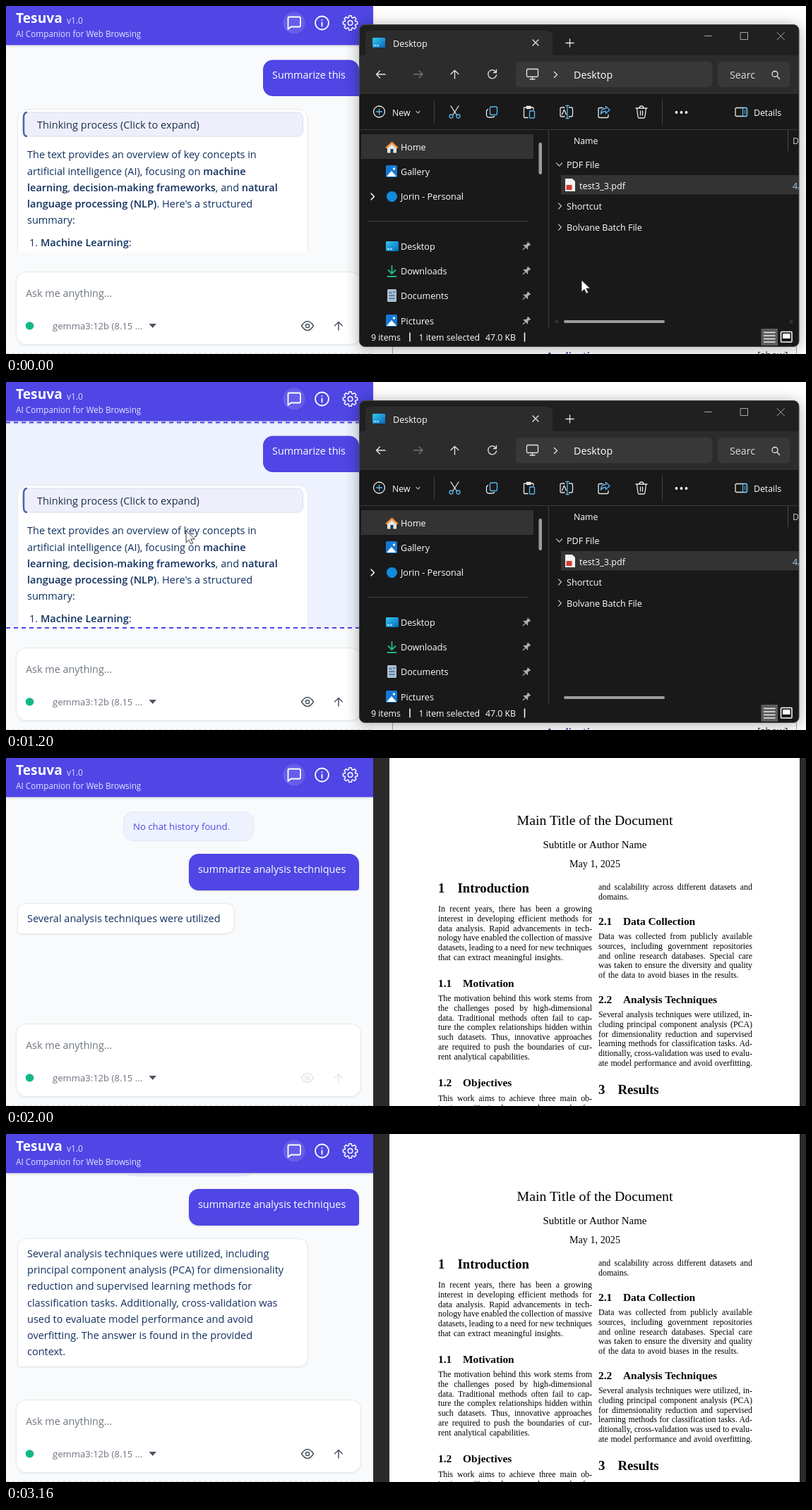
An HTML page for the animation above (3360 ms loop, 1133 by 494 pixels).

```html
<!DOCTYPE html>
<html lang="en">
<head>
<meta charset="utf-8">
<title>Browsing companion demo</title>
<style>
html, body { margin: 0; width: 100%; height: 100%; overflow: hidden; background: #fff; }
#doc, svg { position: absolute; left: 0; top: 0; width: 1133px; height: 494px; overflow: hidden; }
#doc { background: linear-gradient(90deg, #2b2b2b 543px, #fff 543px 1124px, #2b2b2b 1124px); color: #000; }
#doc div { position: absolute; white-space: nowrap; font: 11.9px/13.7px "Liberation Serif", serif; }
#doc .line { width: 218px; text-align-last: justify; word-spacing: -.85px; }
#doc .last { text-align-last: left; word-spacing: 1px; }
#doc .center { left: 543px; width: 582px; text-align: center; }
#doc .h1 { font-size: 18.7px; font-weight: bold; }
#doc .h2 { font-size: 15.4px; font-weight: bold; }
svg { font-family: "Open Sans", "Noto Sans", sans-serif; white-space: pre; }
.body { font-size: 14.5px; fill: #10305f; }
.bold { font-weight: 600; }
.white { font-size: 14.4px; fill: #fff; }
.card { fill: #fff; stroke: #e5e7eb; }
.line { fill: none; stroke-linecap: round; stroke-linejoin: round; }
.file { font-size: 12.6px; fill: #fff; }
.small { font-size: 12.3px; fill: #fff; }
</style>
</head>
<body>
<div id="doc"></div>
<svg viewBox="0 0 1133 494">
<defs>
  <clipPath id="chatClip"><rect y="56" width="520" height="292"/></clipPath>
  <clipPath id="winClip"><rect x="500.5" y="26.5" width="622.5" height="457" rx="8"/></clipPath>
  <linearGradient id="screen" x2="1" y2="1"><stop stop-color="#35c9ea"/><stop offset="1" stop-color="#0869c4"/></linearGradient>
  <g id="desk"><rect width="18" height="14" rx="1.5" fill="url(#screen)"/><path d="M2 11h3M6 11h3" stroke="#c8f4ff" stroke-width="1.5"/></g>
  <g id="photo"><rect width="16" height="17" rx="2" fill="#1778d4"/><path d="M1 16 8 8l7 8z" fill="#fff"/><circle cx="11.5" cy="5" r="1.7" fill="#fff"/></g>
  <g id="pin" transform="rotate(45)"><path d="M-3-6h6v1l-1 1v3l3 3H-5l3-3v-3l-1-1z" fill="#a9b0b6"/><path d="M0 2v5" stroke="#a9b0b6" stroke-width="1.3"/></g>
</defs>

<!-- web page behind the file window -->
<g id="web">
  <rect x="520" width="613" height="494" fill="#fff"/>
  <path d="M547.5 480v14M1119.5 480v14" stroke="#a2a9b1"/>
  <text x="765" y="502" font-size="14" font-weight="700" fill="#3a4fb0">Applications</text>
  <text x="1064" y="501" font-size="14" fill="#333">[show]</text>
</g>

<!-- companion panel -->
<rect width="520" height="494" fill="#f9fafb"/>
<rect id="dropArea" y="56" width="520" height="293"/>
<g clip-path="url(#chatClip)">
  <g id="oldChat">
    <path d="M378 76.5H486a14 14 0 0 1 14 14V128H378a14 14 0 0 1-14-14V90.5a14 14 0 0 1 14-14z" fill="#4f46e5"/>
    <text x="377" y="103" class="white">Summarize this</text>
    <rect class="card" x="16.5" y="146.5" width="411" height="230" rx="14"/>
    <rect x="24" y="151" width="396.5" height="34" rx="8" fill="#eeeffa" stroke="#d9dcec"/>
    <path d="M30 151q-5 0-5 7v20q0 7 5 7" fill="none" stroke="#4668b5" stroke-width="2.5"/>
    <text x="44" y="174" font-size="14.6" fill="#1f2f4d">Thinking process (Click to expand)</text>
    <g class="body">
      <text x="30" y="216">The text provides an overview of key concepts in</text>
      <text x="30" y="240">artificial intelligence (AI), focusing on <tspan class="bold">machine</tspan></text>
      <text x="30" y="263"><tspan class="bold">learning</tspan>, <tspan class="bold">decision-making frameworks</tspan>, and <tspan class="bold">natural</tspan></text>
      <text x="30" y="286"><tspan class="bold">language processing (NLP)</tspan>. Here's a structured</text>
      <text x="30" y="309">summary:</text>
      <text x="33" y="341">1. <tspan class="bold">Machine Learning</tspan>:</text>
    </g>
  </g>
  <g id="newChat">
    <rect x="166.5" y="76.5" width="184" height="41" rx="14" fill="#eef2ff" stroke="#e0e5f5"/>
    <text x="180" y="101.5" font-size="13.2" fill="#4f46e5">No chat history found.</text>
    <g id="question">
      <path d="M273 136H486a14 14 0 0 1 14 14V184a4 4 0 0 1-4 4H273a14 14 0 0 1-14-14V150a14 14 0 0 1 14-14z" fill="#4f46e5" filter="drop-shadow(0 1px 1px #0002)"/>
      <text x="272" y="163" class="white">summarize analysis techniques</text>
    </g>
    <g id="answer">
      <path id="answerCard" class="card" filter="drop-shadow(0 1px 1px #0001)"/>
      <g id="answerText" class="body"></g>
    </g>
  </g>
</g>
<rect id="thumb" x="513" width="2.5" rx="1" fill="#858585"/>
<path id="dropLines" d="M0 57.5H520M0 349H520" stroke-width="1.8" stroke-dasharray="6 5"/>

<rect width="520" height="55.5" fill="#4f46e5" filter="drop-shadow(0 1px 2px #0002)"/>
<text x="14" y="24" font-size="19.2" font-weight="700" fill="#fff">Tesuva</text>
<text x="86" y="25" font-size="12" fill="#e0e0ff">v1.0</text>
<text x="14" y="44" font-size="11.75" fill="#e4e4ff">AI Companion for Web Browsing</text>
<circle cx="408" cy="24" r="15.5" fill="#665eea"/>
<g class="line" stroke="#fff" stroke-width="1.8">
  <path d="M399.5 33V17.5q0-2 2-2h13.5q2 0 2 2v10q0 2-2 2h-11.5z"/>
  <circle cx="447.5" cy="24" r="9.5"/><path d="M447.5 23.5v5M447.5 19.8v.1"/>
  <path id="gear" stroke-width="1.5"/><circle cx="487.5" cy="24" r="3.3" stroke-width="1.5"/>
</g>

<rect id="ring" x="12" y="375" width="493" height="108" rx="16" fill="#dfdffa"/>
<rect id="field" x="14.5" y="377.5" width="488" height="103" rx="14" fill="#fff" filter="drop-shadow(0 1px 1px #0001)"/>
<text id="prompt" x="28" y="413" font-size="14.4"></text>
<path id="caret" d="M237 398v19" stroke="#111"/>
<circle cx="33.5" cy="454" r="5.8" fill="#14b887"/>
<text x="66" y="459" font-size="13.1" fill="#6b7280">gemma3:12b (8.15 ...</text>
<path d="M202.5 451h10.5l-5.25 6z" fill="#4b5563"/>
<g class="line" stroke="#4b5563" stroke-width="1.5">
  <g id="eye"><path d="M418.5 454q8.5-13 17 0-8.5 13-17 0z"/><circle cx="427" cy="454" r="2.6"/></g>
  <path id="send" d="M471 460V448.5M465.5 454l5.5-5.5 5.5 5.5"/>
</g>
<path d="M0 493.5H520" stroke="#d4d4d8" stroke-dasharray="5 3"/>

<!-- file window -->
<g id="win" filter="drop-shadow(0 2px 10px #0005)">
<g clip-path="url(#winClip)">
  <rect x="500" y="26" width="624" height="459" fill="#191919"/>
  <path d="M500 26h624v44H500z" fill="#202020"/>
  <path d="M500 70H509V43q0-8 8-8H766q8 0 8 8V70h350v54H500z" fill="#2c2c2c"/>
  <rect id="minHover" x="969" y="27" width="51" height="31" fill="#303030"/>
  <path d="M500 124H1124M500 175.5H1124" stroke="#3a3a3a"/>
  <rect x="722" y="79" width="278" height="36" rx="5" fill="#383838"/>
  <rect x="1008" y="79" width="102" height="36" rx="5" fill="#383838"/>
  <use href="#desk" x="519" y="45"/>
  <text x="548" y="57.5" class="file">Desktop</text>
  <g font-size="14.3" fill="#fff"><text x="804" y="102.5">Desktop</text><text x="1025" y="102.5" fill="#ddd">Searc</text></g>

  <g class="line" stroke="#e8e8e8" stroke-width="1.3">
    <path d="M746 48l8 8m0-8l-8 8M793 52.5h11M798.5 47v11"/>
    <path d="M537 97h-12.5m5-5-5 5 5 5M635.5 103V91.5m-5.5 5 5.5-5 5.5 5M776.5 93.5l4 4-4 4"/>
    <path d="M577.5 97H590m-5-5 5 5-5 5" stroke="#777"/>
    <path d="M694 94a6 6 0 1 0 .6 4M694.5 90.5V94.5h-4"/>
    <rect x="737.5" y="89.5" width="16" height="11" rx="1.5"/><path d="M742 104h7M745.5 101v3"/>
    <circle cx="1089" cy="96.5" r="4"/><path d="M1092 99.5l3.5 4"/>
    <path d="M989.5 42.5h10M1040.5 37.5h10v10h-10zM1092 37.5l10.5 10.5m0-10.5L1092 48" stroke="#a8a8a8" stroke-width="1"/>
    <circle cx="528.5" cy="150" r="8"/><path d="M528.5 146v8M524.5 150h8" stroke="#58b8f0"/>
    <path d="M581 149.5l2.5 2.5 2.5-2.5" stroke="#aaa"/>
    <path d="M630 142l8.5 13M641 142l-8.5 13"/>
    <g stroke="#58b8f0"><circle cx="630.5" cy="156.5" r="2.5"/><circle cx="640.5" cy="156.5" r="2.5"/></g>
    <rect x="685.5" y="143" width="10" height="11.5" rx="2" stroke="#58b8f0"/><path d="M682.5 147q-2 .5-2 2.5v5q0 3.5 3.5 3.5h5q2 0 2.5-1.5"/>
    <path d="M739 158.5h-4.5q-1 0-1-1V145q0-1 1-1H746q1 0 1 1v2M737.5 142.5h5.5v3h-5.5z"/><rect x="741.5" y="149" width="7" height="10" rx="1" stroke="#58b8f0"/>
    <path d="M791 144h-4q-2 0-2 2v9q0 2 2 2h4M797.5 144h3q2 0 2 2v9q0 2-2 2h-3M787.5 154l3-7 3 7"/><path d="M795 141.5v18M793 141.5h4M793 159.5h4" stroke="#58b8f0"/>
    <path d="M845 144.5h-4q-2 0-2 2v10q0 2 2 2h10q2 0 2-2v-2"/><path d="M849.5 142.5l5.5 5-5.5 5v-3q-5 0-7 4 0-8 7-8z" stroke="#58b8f0"/>
    <path d="M892 145h16M897 145q0-3 3-3t3 3M893.5 145l1.5 12q.2 2 2 2h6q1.8 0 2-2l1.5-12M898.5 149v6M901.5 149v6"/>
    <path d="M606.5 134v33M929.5 134v33" stroke="#3d3d3d"/>
    <rect x="1033" y="144.5" width="16.5" height="12" rx="2"/><path d="M1043.5 144.5h4q2 0 2 2v8q0 2-2 2h-4zM1046 149h1.5M1046 152h1.5" stroke="#58b8f0"/>
  </g>
  <g fill="#fff"><circle cx="949.5" cy="151" r="1.9"/><circle cx="956.5" cy="151" r="1.9"/><circle cx="963.5" cy="151" r="1.9"/></g>
  <text x="547" y="155.5" class="small">New</text>
  <text x="1059" y="155.5" class="small">Details</text>

  <rect x="503" y="182" width="244" height="35" fill="#333"/>
  <rect x="754.5" y="194" width="4.5" height="45" rx="2" fill="#9c9c9c"/>
  <path d="M768.5 176V458" stroke="#303030" stroke-width="2"/>
  <path d="M512 305.5H739" stroke="#444"/>
  <path d="M540 200v8.5h4.5V203h4v5.5h4.5V200l-6.5-6z" fill="#dfe7ec"/><path d="M539 201l7.5-7 7.5 7" class="line" stroke="#f08a35" stroke-width="2.5"/>
  <use href="#photo" x="538" y="226"/>
  <circle cx="546.5" cy="270.5" r="7.5" fill="#128bdd"/>
  <use href="#desk" x="538" y="334"/>
  <path d="M546.5 369v11m-5-5 5 5 5-5M540.5 384h12" class="line" stroke="#23b58c" stroke-width="1.8"/>
  <rect x="540" y="402" width="13" height="18" rx="1.5" fill="#a9bed2"/><path d="M542.5 407h4M542.5 411h8M542.5 415h8M548 406h3" stroke="#47698d" stroke-width="1.5"/>
  <use href="#photo" x="538" y="438"/>
  <g id="places" class="file"></g>

  <rect id="batchHover" x="770" y="299" width="353" height="29" fill="#2d2d2d"/>
  <rect id="fileRow" x="786" y="240" width="337" height="27.5"/>
  <path d="M1107.5 176v30" stroke="#4a4a4a"/>
  <g class="line" stroke="#bbb" stroke-width="1.2"><path d="M779.5 223l4 4 4-4M782.5 280l4 4-4 4M782.5 310l4 4-4 4"/><path d="M517 266l4.5 4.5-4.5 4.5" stroke="#fff" stroke-width="1.5"/></g>
  <path d="M792 245h10l4 4v14h-14z" fill="#f2f2f2"/><rect x="793.5" y="254" width="8" height="7" fill="#d43a32"/>
  <g class="small"><text x="804" y="196">Name</text><text x="1114" y="196" fill="#ccc">Date</text></g>
  <g class="file">
    <text x="794" y="229.5">PDF File</text><text x="812" y="259.5">test3_3.pdf</text><text x="1114" y="259.5" fill="#9fd0f0">4/30</text>
    <text x="794" y="288.5">Shortcut</text><text x="794" y="318.5">Bolvane Batch File</text>
  </g>
  <path id="scrollTips" d="M776 448l6-3.5v7zM1116 448l-6-3.5v7z" fill="#343434"/>
  <rect x="790" y="446" width="143" height="4" rx="2" fill="#9c9c9c"/>
  <rect x="500" y="457.5" width="624" height="27" fill="#191919"/>
  <g class="small"><text x="517" y="475">9 items</text><text x="584.5" y="475">1 item selected</text><text x="679" y="475">47.0 KB</text></g>
  <path d="M572 463.5v13M734.5 463.5v13" stroke="#fff" stroke-width="1.5"/>
  <rect x="1069.5" y="458" width="23.5" height="24" fill="#5c5c5c"/><path d="M1073 463.5h16.5M1073 468h16.5M1073 472.5h16.5M1073 477h16.5" stroke="#eee" stroke-width="1.4"/>
  <rect x="1097.5" y="462.5" width="15.5" height="14.5" rx="1" fill="none" stroke="#fff" stroke-width="1.5"/><path d="M1100 465h10.5v7H1100z" fill="#fff"/>
</g>
<rect x="500.5" y="26.5" width="622.5" height="457" rx="8" fill="none" stroke="#484848"/>
</g>

<!-- pointer, with the dragged item around its tip -->
<g id="pointer">
  <g id="drag">
    <rect x="-46.5" y="-99.5" width="111" height="111" rx="3" fill="#fff" stroke="#444" stroke-width="1.3"/>
    <rect id="label" x="22" y="15.5" width="63" height="21" rx="2" fill="#f4f5f9" stroke="#dfe1e8"/>
    <path d="M26 26.5h13.5m-5.5-5.5 5.5 5.5-5.5 5.5" class="line" stroke="#333" stroke-width="1.2"/>
    <text x="44" y="31" font-size="12.9" fill="#2450c8">Move</text>
    <circle cy="1" r="13.5" fill="#ffe100" opacity=".88"/>
  </g>
  <path d="M0 0V17l4-3.8 3 6 2.8-1.3-3-5.9h5.7z" fill="#fff" stroke="#222" stroke-width=".9"/>
</g>
</svg>
<script>
const LOOP = 3360, LINE = 23.2;
const $ = id => document.getElementById(id);
const show = (id, on) => { $(id).style.display = on ? '' : 'none'; };
const set = (id, name, value) => $(id).setAttribute(name, value);
const latest = (steps, t) => steps.filter(step => step[0] <= t).pop();

// Document page: y is the text baseline.
function put(text, x, y, cls, size) {
  const el = document.createElement('div');
  el.className = cls;
  el.textContent = text;
  if (x) el.style.left = x + 'px';
  if (size) el.style.fontSize = size + 'px';
  el.style.top = y - 11 + 'px';
  $('doc').append(el);
}
// An open paragraph runs on, so its last line is justified too.
function paragraph(x, y, text, open) {
  const lines = text.split('|');
  lines.forEach((line, i) =>
    put(line, x, y + i * 13.8, i == lines.length - 1 && !open ? 'line last' : 'line'));
}
function heading(x, y, number, title, level) {
  const top = y - 1.5 * (3 - level) + 1;
  put(number, x, top, 'h' + level);
  put(title, x + (level == 1 ? 27.5 : 35), top, 'h' + level);
}
put('Main Title of the Document', 0, 93, 'center', 19.8);
put('Subtitle or Author Name', 0, 128, 'center', 14.9);
put('May 1, 2025', 0, 155, 'center', 14.2);
heading(612, 191, '1', 'Introduction', 1);
paragraph(612, 219, 'In recent years, there has been a growing|interest in developing efficient methods for|data analysis. Rapid advancements in tech-|nology have enabled the collection of massive|datasets, leading to a need for new techniques|that can extract meaningful insights.');
heading(612, 324, '1.1', 'Motivation', 2);
paragraph(612, 346, 'The motivation behind this work stems from|the challenges posed by high-dimensional|data. Traditional methods often fail to cap-|ture the complex relationships hidden within|such datasets. Thus, innovative approaches|are required to push the boundaries of cur-|rent analytical capabilities.');
heading(612, 465, '1.2', 'Objectives', 2);
paragraph(612, 488, 'This work aims to achieve three main ob-|jectives: (i) implement robust tools for', true);
paragraph(839, 188, 'and scalability across different datasets and|domains.');
heading(839, 236, '2.1', 'Data Collection', 2);
paragraph(839, 258, 'Data was collected from publicly available|sources, including government repositories|and online research databases. Special care|was taken to ensure the diversity and quality|of the data to avoid biases in the results.');
heading(839, 347, '2.2', 'Analysis Techniques', 2);
paragraph(839, 369, 'Several analysis techniques were utilized, in-|cluding principal component analysis (PCA)|for dimensionality reduction and supervised|learning methods for classification tasks. Ad-|ditionally, cross-validation was used to evalu-|ate model performance and avoid overfitting.', true);
heading(839, 477, '3', 'Results', 1);

// Sidebar places
const places = [['Home', 200], ['Gallery', 235], ['Jorin - Personal', 270.5], ['Desktop', 341], ['Downloads', 376], ['Documents', 411.5], ['Pictures', 447]];
$('places').innerHTML = places.map(([name, y]) =>
  `<text x="559" y="${y + 4.5}">${name}</text>` +
  (y > 300 ? `<g transform="translate(737 ${y})"><use href="#pin"/></g>` : '')).join('');

// Settings gear: eight teeth, four corners each
const corners = Array.from({ length: 32 }, (_, i) => {
  const tooth = Math.floor(i / 4), side = [-.3, -.17, .17, .3][i % 4];
  const angle = tooth * Math.PI / 4 + side, r = i % 4 == 1 || i % 4 == 2 ? 10.3 : 7.8;
  return `${487.5 + r * Math.cos(angle)} ${24 + r * Math.sin(angle)}`;
});
set('gear', 'd', `M${corners.join('L')}z`);

const reply = `Several analysis techniques were utilized, including
principal component analysis (PCA) for dimensionality
reduction and supervised learning methods for
classification tasks. Additionally, cross-validation was
used to evaluate model performance and avoid
overfitting. The answer is found in the provided
context.`;
// [time, last words streamed so far]
const stream = [[2000, 'utilized'], [2160, 'dimensionality'], [2360, 'supervised'], [2560, 'tasks.'],
  [2760, 'performance and'], [2960, 'The answer'], [3160, 'context.']];
// [time, tip x, tip y]
const moves = [[0, 815, 389], [200, 803, 306], [400, 790, 256], [600, 786, 257.5], [800, 322, 190], [1000, 255, 211], [1400, 1009, 46]];

function drawAnswer(t) {
  const step = latest(stream, t);
  show('answer', step);
  const lines = step ? reply.slice(0, reply.indexOf(step[1]) + step[1].length).split('\n') : [];
  const n = lines.length, right = n > 1 ? 427.5 : 323.5, bottom = 226 + n * LINE;
  set('answerCard', 'd', `M30.5 206.5H${right - 14}q14 0 14 14V${bottom - 14}q0 14-14 14H20.5q-4 0-4-4V220.5q0-14 14-14z`);
  $('answerText').innerHTML = lines.map((line, i) => `<text x="30" y="${233 + i * LINE}">${line}</text>`).join('');
  set('newChat', 'transform', `translate(0 ${-Math.max(0, (n - 4.5) * LINE)})`);
  show('thumb', n == 5 || n == 6);
  const top = n == 6 ? 104 : 85;
  set('thumb', 'y', top);
  set('thumb', 'height', 335 - top);
}

function draw(t) {
  const loaded = t >= 1400, typing = t >= 1600 && t < 1760, sent = t >= 1760, done = t >= 3160;
  const dropping = t >= 800 && t < 1400;
  show('web', !loaded);
  show('oldChat', !loaded);
  show('newChat', loaded);
  show('question', sent);
  drawAnswer(t);

  show('dropLines', dropping);
  set('dropLines', 'stroke', t < 1000 ? '#7f79ea' : '#4f46e5');
  set('dropArea', 'fill', !dropping ? '#f9fafb' : t < 1000 ? '#f1f5ff' : '#eef2ff');

  show('ring', typing);
  show('caret', typing);
  set('field', 'stroke', typing ? '#4f46e5' : '#e5e7eb');
  set('prompt', 'fill', typing ? '#1f2937' : '#6f7580');
  $('prompt').textContent = typing ? 'summarize analysis techniques' : 'Ask me anything...';
  set('eye', 'opacity', !loaded || done ? 1 : .15);
  set('send', 'opacity', sent && !done ? .15 : 1);

  show('win', t < 1600);
  show('minHover', loaded);
  show('scrollTips', t < 200);
  show('batchHover', t >= 200 && t < 400);
  set('fileRow', 'fill', t >= 400 && t < 600 ? '#4a4a4a' : '#333');

  const [, x, y] = latest(moves, t);
  show('pointer', t < 1600);
  set('pointer', 'transform', `translate(${x} ${y})`);
  show('drag', t >= 600 && t < 1200);
  set('label', 'width', t < 800 ? 71 : 63);
}

function tick() {
  draw(performance.now() % LOOP);
  requestAnimationFrame(tick);
}
tick();
</script>
</body>
</html>
```
